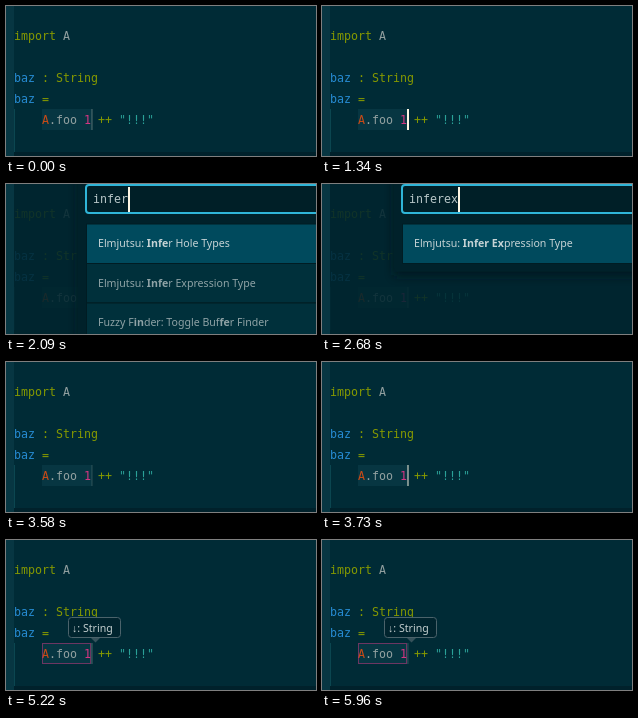
Animation, 310 px wide and 150 px high, one loop 6060 ms. Source, as an HTML page:

```html
<!DOCTYPE html>
<html lang="en">
<head>
<meta charset="utf-8">
<title>Infer expression type</title>
<style>
  html, body { margin: 0; width: 100%; height: 100%; overflow: hidden; background: #002b36; }
  svg { display: block; width: 310px; height: 150px; }
  text { white-space: pre; }
  .code { font: 11.63px "DejaVu Sans Mono", monospace; }
  .ui { font: 10.6px "Noto Sans", sans-serif; }
  .ui .hit { font-weight: 700; }
  .green { fill: #859900; }
  .blue { fill: #268bd2; }
  .grey { fill: #93a1a1; }
  .orange { fill: #cb4b16; }
  .pink { fill: #d33682; }
  .cyan { fill: #2aa198; }
</style>
</head>
<body>
<svg viewBox="0 0 310 150">
  <defs>
    <filter id="soft" x="-20%" y="-40%" width="140%" height="180%"><feGaussianBlur stdDeviation="5"/></filter>
  </defs>
  <rect width="310" height="150" fill="#002b36"/>
  <rect x="36" y="103" width="50" height="21" fill="#073642"/>
  <path d="M8.5 103V146" stroke="#0b4650"/>
  <g class="code">
    <text x="8" y="34"><tspan class="green">import</tspan><tspan class="grey"> A</tspan></text>
    <text x="8" y="76"><tspan class="blue">baz</tspan><tspan class="green"> : String</tspan></text>
    <text x="8" y="97"><tspan class="blue">baz</tspan><tspan class="green"> =</tspan></text>
    <text x="36" y="118"><tspan class="orange">A</tspan><tspan class="grey">.foo </tspan><tspan class="pink">1</tspan><tspan class="green"> ++ </tspan><tspan class="cyan">"!!!"</tspan></text>
  </g>
  <rect id="outline" x="36.5" y="103.5" width="48" height="20" fill="none" stroke="#d33682" stroke-dasharray="1 1"/>
  <rect id="cursor" x="85" y="103" width="2" height="21" fill="#fdf6e3"/>
  <rect y="146" width="310" height="4" fill="#00212b"/>
  <rect width="8" height="150" fill="#073642"/>

  <g id="tooltip">
    <path d="M84 97L89.500 102.500L95 97Z" fill="#36525b"/>
    <rect x="62.500" y="77.500" width="52" height="20" rx="3" fill="#00242e" stroke="#4b636b"/>
    <text class="ui" x="66" y="92" fill="#c3cfcf">↓: String</text>
  </g>

  <rect id="shade" x="8" width="302" height="150" fill="#00252e"/>
  <g id="palette">
    <rect id="shadow" x="72" y="-20" width="260" fill="#00141a" opacity=".7" filter="url(#soft)"/>
    <rect id="panel" x="72" y="-10" width="250" rx="4" fill="#00212a"/>
    <rect x="80" y="1" width="250" height="28" rx="3" fill="#001f27" stroke="#2fb5d8" stroke-width="2"/>
    <text id="query" class="code" x="87" y="19" fill="#b9c8c9"></text>
    <rect id="caret" y="3" width="2" height="25" fill="#fdf6e3"/>
    <g id="items" class="ui"></g>
  </g>
</svg>
<script>
const LOOP = 6060;
const $ = id => document.getElementById(id);
const clamp = v => Math.max(0, Math.min(1, v));

// Start times of each typed prefix; the result list trails the input by one step.
const typing = [[1640, ""], [1790, "i"], [1940, "infe"], [2090, "infer"], [2390, "infere"], [2540, "inferex"]];
const results = [
  [1640, ["Elmjutsu: Infer Hole Types", "Elmjutsu: Infer Expression Type", "Fuzzy Finder: Toggle Buffer Finder"]],
  [1940, ["Elmjutsu: *I*nfer Hole Types", "Elmjutsu: *I*nfer Expression Type", "Fuzzy F*i*nder: Toggle Buffer Finder"]],
  [2090, ["Elmjutsu: *Infe*r Hole Types", "Elmjutsu: *Infe*r Expression Type", "Fuzzy F*in*der: Toggle Buf*fe*r Finder"]],
  [2240, ["Elmjutsu: *Infer* Hole Types", "Elmjutsu: *Infer* Expression Type", "Fuzzy F*in*der: Toggle Buf*fer* Finder"]],
  [2540, ["Elmjutsu: *Infer E*xpression Type", "Fuzzy F*in*der: Toggle Buf*fer* Find*e*r"]],
  [2680, ["Elmjutsu: *Infer Ex*pression Type"]]
];
const dimming = [[0, 0], [1640, .55], [1790, .88], [3130, .4], [3280, .1], [3430, 0]];

const at = (track, t) => track.reduce((v, [start, value]) => t >= start ? value : v, track[0][1]);
const show = (id, amount) => $(id).setAttribute("opacity", amount);

function blink(t) {
  const turn = t < 3130 ? (t - 525) / 890 : (t - 5560) / 800;
  return clamp(.6 + .52 * Math.cos(turn * 2 * Math.PI));
}

function item(label, i) {
  const y = 40 + i * 39.5;
  const spans = label.split("*").map((s, k) => `<tspan${k % 2 ? ' class="hit"' : ""}>${s}</tspan>`).join("");
  return `<rect x="80.5" y="${y}" width="240" height="39.5" fill="${i ? "#00303b" : "#004a5d"}" stroke="#001c23"/>` +
    `<text x="92" y="${y + 23}" fill="${i ? "#8fa3a6" : "#c6d3d5"}">${spans}</text>`;
}

let shown;
function drawPalette(t) {
  const list = at(results, t);
  const query = at(typing, t);
  $("query").textContent = query;
  $("caret").setAttribute("x", 87 + query.length * 7);
  if (list === shown) return;
  shown = list;
  $("items").innerHTML = list.map(item).join("");
  const bottom = 48 + list.length * 39.5;
  $("panel").setAttribute("height", bottom + 10);
  $("shadow").setAttribute("height", bottom + 24);
}

function render(time) {
  const t = Math.round(Math.floor((time + 8) / 149) * 14.9) * 10;
  const open = t >= 1640 && t < 3130;
  show("cursor", blink(t));
  show("outline", t >= 3870 ? 1 : 0);
  show("tooltip", t < 4170 ? 0 : t < 4320 ? .5 : 1);
  show("shade", at(dimming, time));
  show("palette", open || (time >= 1640 && time < 3130) ? 1 : 0);
  drawPalette(time);
}

function tick(now) {
  render(now % LOOP);
  requestAnimationFrame(tick);
}
render(0);
requestAnimationFrame(tick);
</script>
</body>
</html>
```
